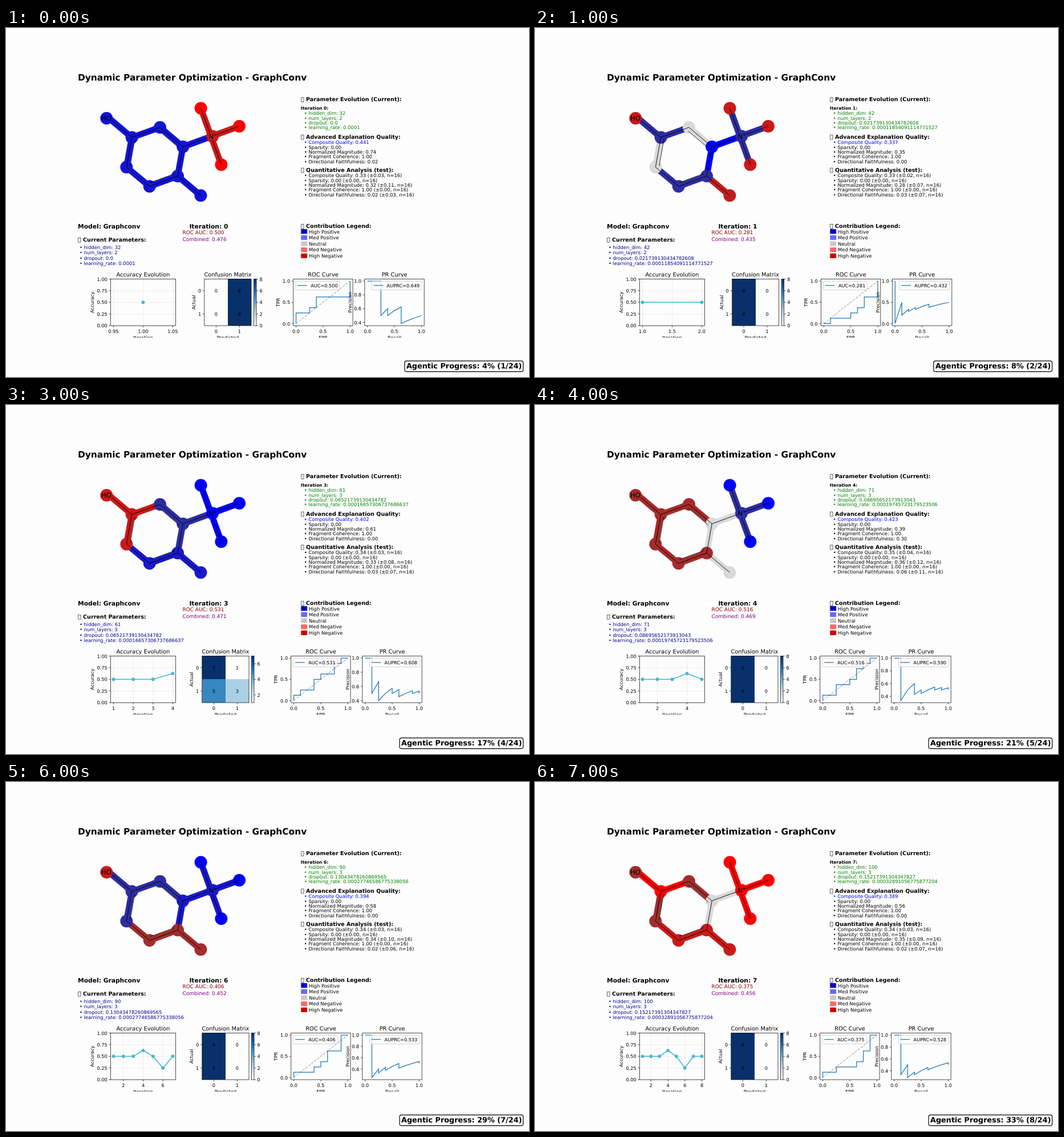
Recreate the animation shown at these times as an HTML page. Size 917 by 611 pixels, loop 8 s.

```html
<!DOCTYPE html>
<html lang="en">
<head>
<meta charset="utf-8">
<title>Dynamic Parameter Optimization</title>
<style>
html, body { margin: 0; width: 100%; height: 100%; overflow: hidden; background: #fdfdfd; }
svg { display: block; width: 917px; height: 611px; font-family: "DejaVu Sans", sans-serif; text-rendering: geometricPrecision; }
</style>
</head>
<body>
<svg id="stage" viewBox="0 0 917 611"></svg>
<script>
const stage = document.getElementById('stage');
const STEP = 1000, TOP = 439.4, BOTTOM = 521.1, PAPER = '#fdfdfd';

// scores: HO, six ring carbons, N, its three methyls (shared), ring methyl
// rank: test samples by falling score, P positive, N negative
const runs = [
  { lr: '0.0001', comb: '0.476', own: ['0.441', '0.74', '0.02'], test: ['0.33 (±0.03', '0.32 (±0.11', '0.02 (±0.03'],
    scores: [.65, .6, .6, .6, .6, .6, .6, -.5, -1, .65], rank: 'PPNNPNPPNNNNNPPP', cm: [0, 8, 0, 8], acc: .5, key: 'top' },
  { lr: '0.00011854091114771527', comb: '0.435', own: ['0.337', '0.35', '0.00'], test: ['0.33 (±0.02', '0.28 (±0.07', '0.03 (±0.07'],
    scores: [-.5, .1, 0, 1, .1, .1, 0, .1, -.5, -.4], rank: 'NPNNNPNPNPPNNPPP', cm: [8, 0, 8, 0], acc: .5, key: 'top' },
  { lr: '0.00014051947615730543', comb: '0.466', own: ['0.415', '0.66', '0.00'], test: ['0.34 (±0.02', '0.34 (±0.07', '0.03 (±0.08'],
    scores: [-.85, .4, .4, -.85, 1, 1, .4, -.65, -.65, -.65], rank: 'NNNNNNPPPPPPPNPN', cm: [8, 0, 8, 0], acc: .5, key: 'low' },
  { comb: '0.471', own: ['0.402', '0.61', '0.00'], test: ['0.34 (±0.03', '0.33 (±0.08', '0.03 (±0.07'],
    scores: [-.5, -.5, .1, .1, .5, .5, -.5, 1, 1, .5], rank: 'PNPNNPPNPNNPPNPN', cm: [7, 1, 5, 3], acc: .625, key: 'top' },
  { lr: '0.00019745723179523506', comb: '0.469', own: ['0.423', '0.39', '0.30'], test: ['0.35 (±0.04', '0.36 (±0.12', '0.06 (±0.11'],
    scores: [-.15, -.15, -.15, 0, -.15, -.15, -.15, .1, 1, 0], rank: 'PNNPPNNPNPPNPNPN', cm: [8, 0, 8, 0], acc: .5, key: 'top' },
  { lr: '0.00023406760169712777', comb: '0.295', own: ['0.361', '0.45', '0.00'], test: ['0.34 (±0.04', '0.34 (±0.10', '0.02 (±0.07'],
    scores: [-.1, .15, 0, .3, .15, -.1, 0, 1, 1, -.1], rank: 'PNNNNNPPNPPPPNPN', cm: [3, 5, 7, 1], acc: .25, key: 'mid' },
  { comb: '0.452', own: ['0.394', '0.58', '0.00'], test: ['0.34 (±0.03', '0.34 (±0.10', '0.02 (±0.06'],
    scores: [-.5, .1, .1, .5, -.1, -.1, .1, .5, 1, -.1], rank: 'PNNNPNPNPPNNPPPN', cm: [8, 0, 8, 0], acc: .5, key: 'top' },
  { lr: '0.00032891056775877204', comb: '0.456', own: ['0.389', '0.56', '0.00'], test: ['0.34 (±0.03', '0.35 (±0.09', '0.02 (±0.07'],
    scores: [-.1, -1, -.1, 0, -.5, -.5, -.1, -1, -1, -.5], rank: 'PNNPNNNPNPPNPPPN', cm: [8, 0, 8, 0], acc: .5, key: 'top' }
];

const attrs = o => Object.entries(o).map(([k, v]) => ` ${k}="${v}"`).join('');
const text = (x, y, s, size, o = {}) => `<text x="${x}" y="${y}" font-size="${size}"${attrs(o)}>${s}</text>`;
const bold = (x, y, s, size, o = {}) => text(x, y, s, size, { 'font-weight': 700, ...o });
const rect = (x, y, w, h, fill, o = {}) => `<rect x="${x}" y="${y}" width="${w}" height="${h}" fill="${fill}"${attrs(o)}/>`;
const line = (x1, y1, x2, y2, color, w, o = {}) =>
  `<path d="M${x1} ${y1}L${x2} ${y2}" stroke="${color}" stroke-width="${w}"${attrs(o)}/>`;
const curve = (pts, color, w, o = {}) =>
  `<polyline points="${pts.map(p => p.join()).join(' ')}" fill="none" stroke="${color}" stroke-width="${w}"${attrs(o)}/>`;
const mid = { 'text-anchor': 'middle' }, end = { 'text-anchor': 'end' };

// heading with an empty glyph box in front
const heading = (x, y, s) =>
  rect(x + .75, y - 6.5, 4.25, 7.95, 'none', { stroke: '#000', 'stroke-width': .6 }) + bold(x + 9.1, y, s, 9.57);
const list = (x, y, gap, items, fill) =>
  items.map((s, k) => text(x, y + k * gap, '• ' + s, 8.38, { fill })).join('');

// ---- molecule ----
const atoms = [[180.4, 157.8], [220.6, 191.6], [270, 174], [310.2, 208], [301, 259.3], [251.7, 277.3], [211.3, 243.6],
  [359.6, 190], [341.6, 140.5], [409, 172], [377.4, 239.2], [341.4, 293.2]];
// discs of labelled atoms sit on the middle of the label
const discs = atoms.slice();
discs[0] = [176.3, 158];
discs[7] = [362, 189.6];
// the first atom of a bond gives its colour
const bonds = [[1, 0], [1, 2], [2, 3], [3, 4], [4, 5], [5, 6], [6, 1], [3, 7], [7, 8], [7, 9], [7, 10], [11, 4]];
const ringMid = [260.8, 225.6];

function shade(s) {
  if (!s) return '#d9d9d9';
  const low = Math.round(50 * (1 - Math.abs(s))), high = Math.round(255 - 2.1 * low);
  return s > 0 ? `rgb(${low},${low},${high})` : `rgb(${high},${low},${low})`;
}

function toward(a, b, d) {
  const n = Math.hypot(b[0] - a[0], b[1] - a[1]);
  return [a[0] + (b[0] - a[0]) * d / n, a[1] + (b[1] - a[1]) * d / n];
}

function molecule(scores) {
  const tint = k => shade(scores[k < 8 ? k : k < 11 ? 8 : 9]);
  const gap = k => k === 0 || k === 7 ? 6.5 : 0;
  const inner = k => atoms[k].map((v, j) => ringMid[j] + (v - ringMid[j]) * .87);
  let s = bonds.map(([a, b]) => line(...atoms[a], ...atoms[b], tint(a), 11)).join('');
  s += discs.map((p, k) => `<circle cx="${p[0]}" cy="${p[1]}" r="11" fill="${tint(k)}"/>`).join('');
  for (const [a, b] of bonds)
    s += line(...toward(atoms[a], atoms[b], gap(a)), ...toward(atoms[b], atoms[a], gap(b)), '#000', .9);
  for (const [a, b] of [[2, 3], [4, 5], [6, 1]]) s += line(...inner(a), ...inner(b), '#000', .8);
  return s + text(167, 162.3, 'HO', 11.6) + text(355.4, 193.8, 'N', 11.6) + text(363.6, 189.4, '+', 7.5);
}

// ---- charts ----
const frame = (x, w) => rect(x, TOP, w, BOTTOM - TOP, 'none', { stroke: '#000', 'stroke-width': .7 });
const xTick = (x, s) => line(x, BOTTOM, x, BOTTOM + 2.9, '#000', .7) + text(x, 534, s, 8.19, mid);
const yTick = (x, y, s) => line(x - 2.9, y, x, y, '#000', .7) + text(x - 5.7, y + 3.1, s, 8.19, end);
const sideLabel = (x, s) => text(x + 3, 480.3, s, 8.19, { ...mid, transform: `rotate(-90 ${x + 3} 480.3)` });
const captions = (x, title, below) => text(x, 434.6, title, 9.83, mid) + text(x, 545, below, 8.19, mid);

function accuracy(n) {
  const at = v => n > 1 ? 188.5 + (v - 1) / (n - 1) * 104 : 240.4 + (v - 1) * 1040;
  const yOf = v => BOTTOM - v * (BOTTOM - TOP);
  const ticks = n === 1 ? ['0.95', '1.00', '1.05'] : n === 2 ? ['1.0', '1.5', '2.0']
    : [1, 2, 3, 4, 5, 6, 7, 8].filter(v => v <= n && (n < 5 || v % 2 === 0));
  const grid = { opacity: .3 };
  let s = rect(183.3, TOP, 114.3, BOTTOM - TOP, PAPER);
  for (const t of ticks) s += line(at(+t), TOP, at(+t), BOTTOM, '#b0b0b0', .7, grid) + xTick(at(+t), t);
  for (const v of [0, .25, .5, .75, 1])
    s += line(183.3, yOf(v), 297.6, yOf(v), '#b0b0b0', .7, grid) + yTick(183.3, yOf(v), v.toFixed(2));
  const pts = runs.slice(0, n).map((r, k) => [at(k + 1), yOf(r.acc)]);
  s += curve(pts, '#45b7d1', 1.6);
  s += pts.map(p => `<circle cx="${p[0]}" cy="${p[1]}" r="2.9" fill="#45b7d1"/>`).join('');
  return s + frame(183.3, 114.3) + sideLabel(151.3, 'Accuracy') + captions(240.4, 'Accuracy Evolution', 'Iteration');
}

const blues = ['fdfdfd', 'deebf7', 'c6dbef', '9ecae1', '6baed6', '4292c6', '2171b5', '08519c', '08306b'];
function blue(v) {
  const k = Math.min(7, Math.floor(v * 8)), f = v * 8 - k;
  const part = (hex, j) => parseInt(hex.substr(j * 2, 2), 16);
  return `rgb(${[0, 1, 2].map(j => Math.round(part(blues[k], j) * (1 - f) + part(blues[k + 1], j) * f))})`;
}

function confusion(cm, dx) {
  const x = 343.8 + dx, cell = 41.1, h = (BOTTOM - TOP) / 2;
  const min = Math.min(...cm), max = Math.max(...cm), bar = x + 86.8;
  let s = '', nums = '';
  cm.forEach((v, k) => {
    const cx = x + (k % 2) * cell, cy = TOP + (k >> 1) * h;
    s += rect(cx, cy, cell, h, blue((v - min) / (max - min)), { 'shape-rendering': 'crispEdges' });
    nums += text(cx + cell / 2, cy + h / 2 + 3.1, v, 8.19, mid);
  });
  s += nums + frame(x, cell * 2);
  for (const k of [0, 1]) s += xTick(x + cell * (k + .5), k) + yTick(x, TOP + h * (k + .5), k);
  s += rect(bar, TOP, 4.4, BOTTOM - TOP, 'url(#blues)', { stroke: '#000', 'stroke-width': .7 });
  for (let v = 0; v <= 8; v += 2) if (v >= min && v <= max) {
    const y = BOTTOM - (v - min) / (max - min) * (BOTTOM - TOP);
    s += line(bar + 4.4, y, bar + 7.3, y, '#000', .7) + text(bar + 10, y + 3.1, v, 8.19);
  }
  return s + sideLabel(x - 18.7, 'Actual') + captions(x + cell, 'Confusion Matrix', 'Predicted');
}

function legend(x, y, w, s) {
  return rect(x, y, w, 15.2, PAPER, { rx: 1.6, 'fill-opacity': .8, stroke: '#ccc', 'stroke-width': .8 }) +
    line(x + 3.3, y + 7.3, x + 19.7, y + 7.3, '#1f77b4', 1.25) + text(x + 26.2, y + 10.6, s, 8.19);
}

// both curves follow from walking down the ranking
function walk(rank) {
  const roc = [[0, 0]], pr = [[0, 1]];
  let tp = 0, fp = 0, auc = 0, ap = 0;
  for (const c of rank) {
    if (c === 'P') { tp++; ap += tp / (tp + fp) / 8; } else { fp++; auc += tp / 64; }
    roc.push([fp / 8, tp / 8]);
    pr.push([tp / 8, tp / (tp + fp)]);
  }
  return { roc, pr, auc: auc.toFixed(3), ap: ap.toFixed(3) };
}

function plot(x, pts, low, ticks, digits, extra = '') {
  const px = v => x + 4.75 + v * 94.8, py = v => 517.4 - (v - low) / (1 - low) * 74.3;
  let s = rect(x, TOP, 104.3, BOTTOM - TOP, PAPER);
  for (const v of [0, .5, 1]) s += xTick(px(v), v.toFixed(1));
  for (const v of ticks) s += yTick(x, py(v), v.toFixed(digits));
  return s + curve(pts.map(p => [px(p[0]), py(p[1])]), '#1f77b4', 1.25) + extra + frame(x, 104.3);
}

function curves(run, dx) {
  const c = walk(run.rank), x1 = 499.8 + dx, x2 = 624.9 + dx;
  const diag = line(x1 + 4.75, 517.4, x1 + 99.55, 443.1, '#000', 1.2, { opacity: .3, 'stroke-dasharray': '4.5 2' });
  const keyY = { top: 443.4, mid: 472.7, low: 502.2 }[run.key];
  const keyX = run.key === 'mid' ? x1 + 22.9 : x1 + 4.2;
  const low = Math.min(...c.pr.map(p => p[1]));
  const fine = low > .1 && low < .2;
  const ticks = low < .1 ? [0, .5, 1] : fine ? [.25, .5, .75, 1] : [.4, .6, .8, 1];
  return plot(x1, c.roc, 0, [0, .5, 1], 1, diag) + legend(keyX, keyY, 77.2, 'AUC=' + c.auc) +
    sideLabel(x1 - 26.6, 'TPR') + captions(x1 + 52.2, 'ROC Curve', 'FPR') +
    plot(x2, c.pr, low, ticks, fine ? 2 : 1) + legend(x2 + 12.5, 443.4, 87.7, 'AUPRC=' + c.ap) +
    sideLabel(x2 - (fine ? 31 : 25.6), 'Precision') + captions(x2 + 52.2, 'PR Curve', 'Recall');
}

// ---- text panels ----
function panels(i, run) {
  const params = [
    'hidden_dim: ' + Math.round(32 + i * 224 / 23),
    'num_layers: ' + Math.round(2 + i * 4 / 23),
    'dropout: ' + (i ? i * .5 / 23 : '0.0'),
    'learning_rate: ' + (run.lr || 1e-4 * 50 ** (i / 23))
  ];
  const [cq, nm, df] = run.own, [tq, tm, tf] = run.test.map(s => s + ', n=16)');
  const key = [['#0000cc', 'High Positive'], ['#6666ff', 'Med Positive'], ['#c8c8c8', 'Neutral'],
    ['#ff6666', 'Med Negative'], ['#cc0000', 'High Negative']];
  return bold(125.9, 92.3, 'Dynamic Parameter Optimization - GraphConv', 15.43) +
    heading(517, 128.2, 'Parameter Evolution (Current):') +
    bold(516.8, 142.8, `Iteration ${i}:`, 7.65) +
    list(522.8, 152.4, 8.33, params, '#008000') +
    heading(517, 193.6, 'Advanced Explanation Quality:') +
    list(522.8, 203.3, 8.33, ['Composite Quality: ' + cq], '#0000ff') +
    list(522.8, 211.6, 8.33, ['Sparsity: 0.00', 'Normalized Magnitude: ' + nm, 'Fragment Coherence: 1.00',
      'Directional Faithfulness: ' + df], '#000') +
    heading(517, 251.6, 'Quantitative Analysis (test):') +
    list(522.8, 261.2, 8.33, ['Composite Quality: ' + tq, 'Sparsity: 0.00 (±0.00, n=16)', 'Normalized Magnitude: ' + tm,
      'Fragment Coherence: 1.00 (±0.00, n=16)', 'Directional Faithfulness: ' + tf], '#000') +
    bold(126.1, 351.4, 'Model: Graphconv', 10.7) + bold(321.4, 351.4, 'Iteration: ' + i, 10.7) +
    text(309.4, 361.3, 'ROC AUC: ' + walk(run.rank).auc, 9, { fill: '#8b0000' }) +
    text(309.4, 373.2, 'Combined: ' + run.comb, 9, { fill: '#800080' }) +
    heading(126, 373.7, 'Current Parameters:') +
    list(128.9, 386.7, 9.45, params, '#00008b') +
    heading(517, 350, 'Contribution Legend:') +
    key.map(([c, s], k) => rect(517.3, 352.2 + k * 10.65, 10.8, 8.1, c) + text(531, 359.5 + k * 10.65, s, 8.38)).join('');
}

function progress(i) {
  const pct = ['4', '8', '12', '17', '21', '25', '29', '33'][i], x = pct.length > 1 ? 690.1 : 698.9;
  return rect(x, 582.8, 906.8 - x, 18.9, PAPER, { rx: 3.5, stroke: '#000', 'stroke-width': 1.2 }) +
    bold(904.5, 596.3, `Agentic Progress: ${pct}% (${i + 1}/24)`, 12.83, end);
}

const defs = '<defs><clipPath id="crop"><rect width="917" height="542.3"/></clipPath>' +
  '<linearGradient id="blues" x1="0" y1="1" x2="0" y2="0">' +
  blues.map((c, k) => `<stop offset="${k / 8}" stop-color="#${c}"/>`).join('') + '</linearGradient></defs>';

function draw(i) {
  const run = runs[i], dx = [4, 1.7][i] || 0;
  stage.innerHTML = defs + rect(0, 0, 917, 611, PAPER) + molecule(run.scores) + panels(i, run) +
    `<g clip-path="url(#crop)">${accuracy(i + 1)}${confusion(run.cm, dx)}${curves(run, dx)}</g>` + progress(i);
}

let shown = 0;
draw(0);
const start = performance.now();
function tick() {
  const i = Math.floor((performance.now() - start) / STEP) % runs.length;
  if (i !== shown) draw(shown = i);
  requestAnimationFrame(tick);
}
requestAnimationFrame(tick);
</script>
</body>
</html>
```
